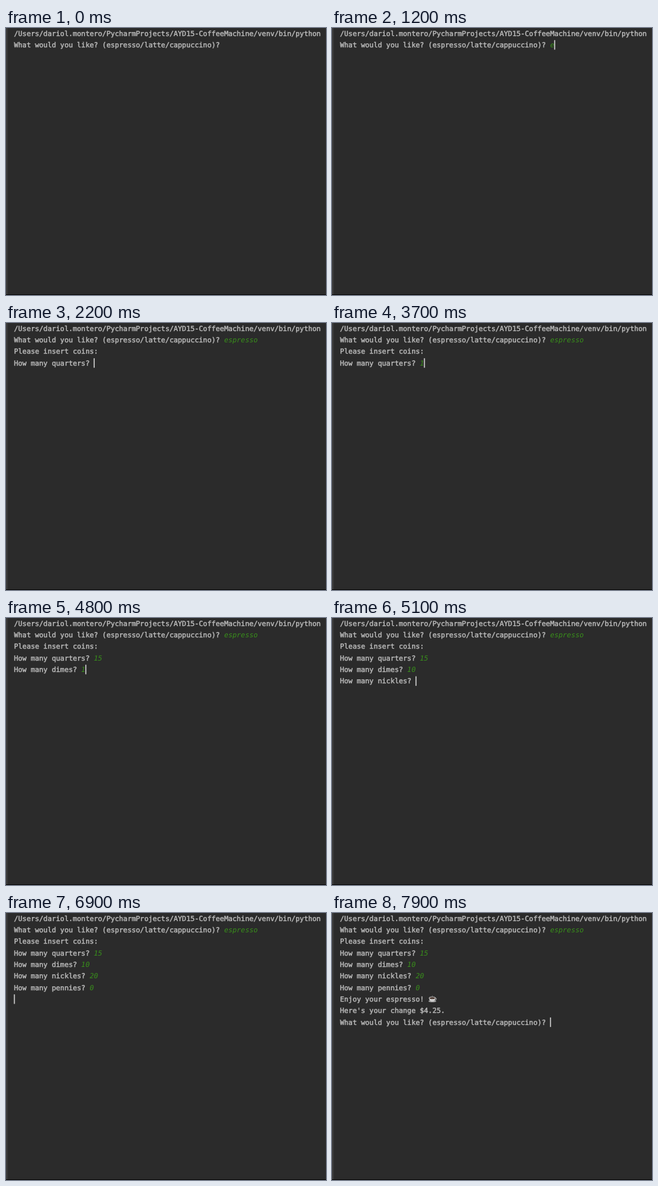
Write an HTML page with a canvas that moves like this. It is 480x401 px and loops after 8 s.

```html
<!DOCTYPE html>
<html lang="en">
<head>
<meta charset="utf-8">
<title>Coffee machine console</title>
<style>
  html, body { margin: 0; width: 100%; height: 100%; overflow: hidden; background: #2b2b2b; }
  canvas { display: block; width: 480px; height: 401px; }
</style>
</head>
<body>
<canvas id="stage" width="480" height="401"></canvas>
<script>
const ctx = document.getElementById("stage").getContext("2d");
const LOOP = 8000;
const LEFT = 12, BASELINE = 11.7, PITCH = 17.33;
const FONT = '10.48px "DejaVu Sans Mono", monospace';
const COLORS = { back: "#2b2b2b", edge: "#3b3b3b", text: "#bdbdbd", input: "#39901b", caret: "#d2d2d2" };

// Each row: when the prompt appears, its text, and [time, typed input] steps.
const ORDER = "What would you like? (espresso/latte/cappuccino)? ";
const rows = [
  { at: 0, text: "/Users/dariol.montero/PycharmProjects/AYD15-CoffeeMachine/venv/bin/python" },
  { at: 0, text: ORDER, typed: [[1200, "e"], [1300, "es"], [1400, "espr"], [1500, "espre"], [1600, "espress"], [1800, "espresso"]] },
  { at: 2200, text: "Please insert coins:" },
  { at: 2200, text: "How many quarters? ", typed: [[2900, "1"], [4200, "15"]] },
  { at: 4200, text: "How many dimes? ", typed: [[4800, "1"], [4900, "10"]] },
  { at: 5100, text: "How many nickles? ", typed: [[5800, "20"]] },
  { at: 6200, text: "How many pennies? ", typed: [[6500, "0"]] },
  { at: 7100, text: "Enjoy your espresso! ", cup: true },
  { at: 7100, text: "Here's your change $4.25." },
  { at: 7100, text: ORDER }
];

// [time, row, follows text]: where the caret sits from that time on.
const caretStops = [
  [600, 1, true], [1900, 2, false], [2200, 3, true], [4200, 4, true],
  [5100, 5, true], [6200, 6, true], [6900, 7, false], [7100, 9, true]
];

const latest = (steps, t) => steps.filter(step => step[0] <= t).pop();

function rect(color, x, y, w, h) {
  ctx.fillStyle = color;
  ctx.fillRect(x, y, w, h);
}

// A thin outline in the same colour gives the text a medium weight.
function write(text, x, y, color, { style = "", outline = 0 }) {
  ctx.font = style + FONT;
  ctx.fillStyle = ctx.strokeStyle = color;
  ctx.fillText(text, x, y);
  if (outline) {
    ctx.lineWidth = outline;
    ctx.strokeText(text, x, y);
  }
  return x + ctx.measureText(text).width;
}

function ellipse(color, x, y, rx, ry, end = 2 * Math.PI) {
  ctx.fillStyle = color;
  ctx.beginPath();
  ctx.ellipse(x, y, rx, ry, 0, 0, end);
  ctx.fill();
}

function drawCup(x, y) {
  ctx.save();
  ctx.translate(x, y);
  ellipse("#a9a9a9", 6.2, -0.6, 5.8, 1.7);
  ctx.strokeStyle = "#c4c4c4";
  ctx.lineWidth = 1;
  ctx.beginPath();
  ctx.arc(10.6, -4, 1.5, -1.8, 1.8);
  ctx.stroke();
  ellipse("#d2d2d2", 6, -5.2, 4.8, 5, Math.PI);
  ellipse("#d8d8d8", 6, -5.4, 4.8, 2.1);
  ellipse("#4a382f", 6, -5.3, 4, 1.5);
  ctx.strokeStyle = "#777";
  ctx.lineWidth = 0.8;
  ctx.beginPath();
  ctx.moveTo(6, -6);
  ctx.quadraticCurveTo(5, -7.5, 6.5, -9);
  ctx.stroke();
  ctx.restore();
}

function draw(t) {
  rect(COLORS.back, 0, 0, 480, 401);
  rect(COLORS.edge, 0, 0, 2.5, 400);
  rect("#080808", 0, 400, 480, 1);

  const ends = rows.map((row, i) => {
    if (t < row.at) return LEFT;
    const y = BASELINE + i * PITCH;
    const x = write(row.text, LEFT, y, COLORS.text, { outline: 0.4 });
    if (row.cup) drawCup(x, y);
    const step = latest(row.typed || [], t);
    return step ? write(step[1], x, y, COLORS.input, { style: "italic " }) : x;
  });

  const stop = latest(caretStops, t);
  if (stop) {
    const [, row, follows] = stop;
    rect(COLORS.caret, (follows ? ends[row] : LEFT) - 0.2, 0.9 + row * PITCH, 1.5, 14.3);
  }
}

ctx.textRendering = "geometricPrecision";
ctx.lineJoin = "round";
const start = performance.now();
function tick() {
  draw((performance.now() - start) % LOOP);
  requestAnimationFrame(tick);
}
tick();
</script>
</body>
</html>
```
